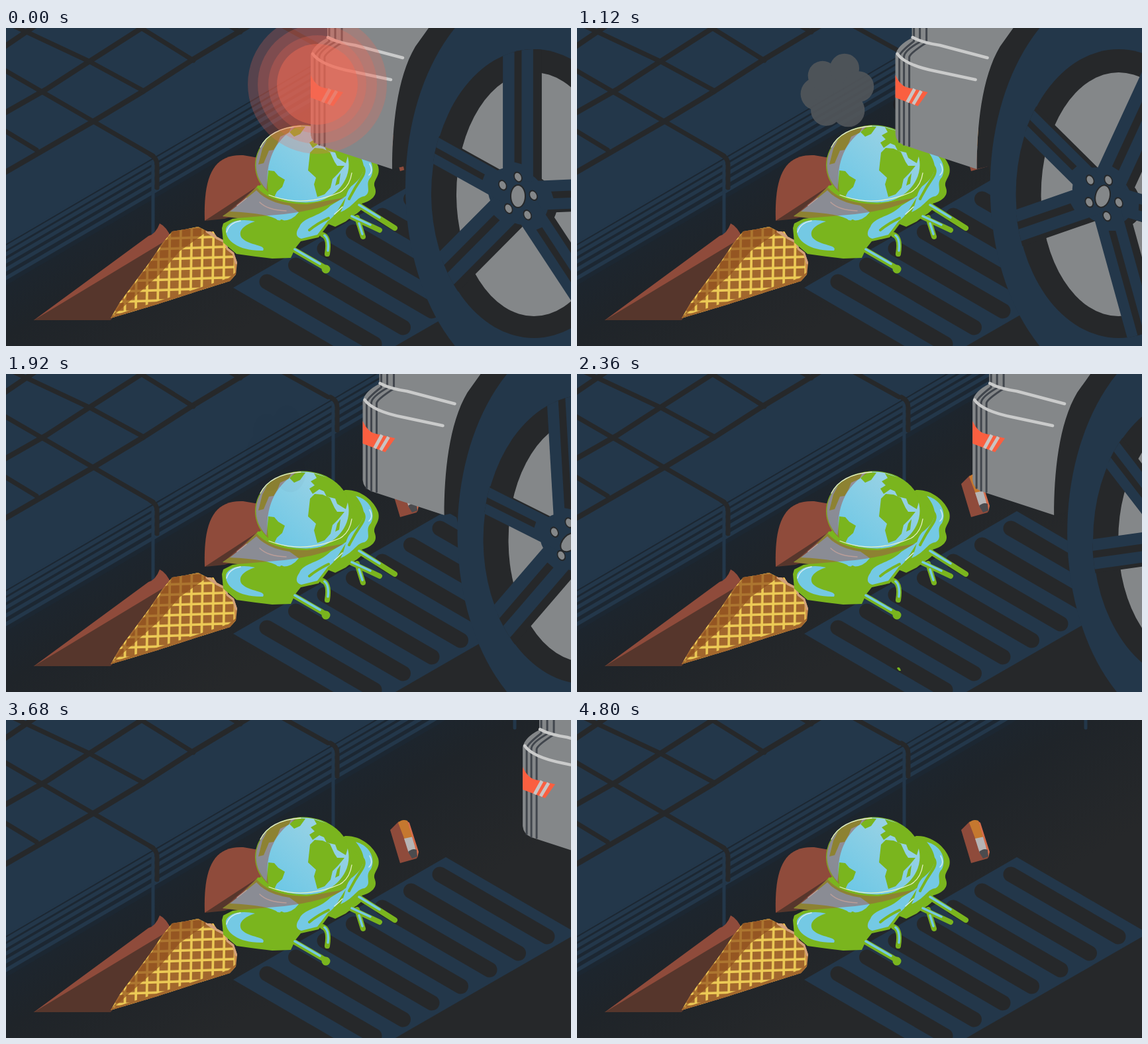
Recreate the animation shown at these times as an HTML page. Size 853 by 480 pixels, loop 5 s.

```html
<!DOCTYPE html>
<html lang="en">
<head>
<meta charset="utf-8">
<title>Melting world</title>
<style>
html, body { margin: 0; width: 100%; height: 100%; overflow: hidden; background: #26282a; }
svg { display: block; width: 100%; height: 100%; }
.navy { fill: #23374a; }
.dark { fill: #26282a; }
.grey { fill: #848789; }
.green { fill: #7ab51e; }
.blue { fill: #74c9e4; }
.red { fill: #8f4b3b; }
.brown { fill: #56362c; }
.line { fill: none; stroke-linecap: round; stroke-linejoin: round; }
</style>
</head>
<body>
<svg viewBox="0 0 853 480" preserveAspectRatio="none">
<defs>
  <linearGradient id="street" gradientUnits="userSpaceOnUse" x1="250" y1="180" x2="400" y2="430">
    <stop offset="0" stop-color="#1b2631"/><stop offset=".4" stop-color="#1f2429"/><stop offset="1" stop-color="#26282a"/>
  </linearGradient>
  <linearGradient id="sea" x1="0" x2="1" y1="1" y2="0">
    <stop offset="0" stop-color="#63c5e6"/><stop offset="1" stop-color="#a5d5e4"/>
  </linearGradient>
  <pattern id="waffle" width="16.5" height="15.5" patternUnits="userSpaceOnUse" patternTransform="translate(278 330) rotate(-2) skewX(-3)">
    <path d="M0 0H18V16H0Z" fill="#a2672d"/><path d="M0 2H18M2 0V16" stroke="#edcb56" stroke-width="3.6"/>
  </pattern>
  <clipPath id="rim"><ellipse cx="797" cy="250" rx="156" ry="218"/></clipPath>
  <clipPath id="ball"><ellipse cx="448" cy="207" rx="71" ry="60"/></clipPath>
  <clipPath id="cone"><path id="conePath" d="M158 438L172 414 192 387 218 352 236 325 251 307 270 304 290 300 304 307 313 307 318 315 332 322 335 332 344 339 349 354 347 372 338 382 290 397 225 418Z"/></clipPath>
  <g id="spokes"></g>
</defs>

<path fill="url(#street)" d="M0 0H853V480H0Z"/>
<path class="navy" d="M0 0H556L0 325Z"/>
<g id="pavement" class="line"></g>
<path class="navy" d="M343 392L664 207 862 322 541 507Z"/>
<g id="slots" class="line" stroke="#26282a" stroke-width="23"></g>

<!-- cone -->
<path class="red" d="M42 441L215 314Q226 311 232 295 243 300 250 318L158 440Z"/>
<path class="brown" d="M42 441L246 318 240 340 158 441Z"/>
<use href="#conePath" fill="#c98b4a"/>
<g clip-path="url(#cone)">
  <path fill="url(#waffle)" d="M150 290H340L347 390 150 450Z"/>
  <path fill="#8f4f1e" opacity=".68" d="M158 438L251 307 290 300 304 307 262 337 232 372 205 396Z"/>
  <path class="line" stroke="#a2672d" stroke-width="8" d="M160 439L290 397 338 381 349 372"/>
  <path class="line" stroke="#d2a07a" stroke-width="5" d="M304 307L318 316 332 323 335 333 344 340 348 354"/>
</g>

<!-- melting globe -->
<path class="red" d="M300 291C298 225 312 190 358 192L381 196 395 240Z"/>
<path class="brown" d="M300 291L378 240 384 270 330 288Z"/>
<path class="green" d="M327 284L350 268 378 240 512 175C535 174 556 191 562 209 566 225 552 230 557 241 562 255 548 262 537 265 543 275 527 280 513 292L497 300 487 296 472 316 445 322 437 332 430 347 402 348 377 345 348 341 328 324 326 302 328 295 342 288 350 287Z"/>
<g class="line" stroke="#7ab51e" stroke-width="8">
  <path d="M530 266L587 302M515 282L564 305M530 286L539 315M478 312Q489 316 485 341M432 333L482 362"/>
  <circle cx="483" cy="364" r="2.5"/>
</g>
<g class="line" stroke="#74c9e4" stroke-width="3.5">
  <path d="M533 267L564 286M522 284L550 297M533 295L538 311M481 313Q488 319 486 336M436 334L474 356"/>
</g>
<g class="blue">
  <path d="M332 303C336 291 356 287 376 292 360 297 349 306 356 317 368 329 394 327 388 336 352 337 330 321 332 303Z"/>
  <path d="M443 300C449 285 472 286 490 268L516 252C503 268 500 282 486 291L470 312 446 318C437 316 437 308 443 300Z"/>
  <path d="M528 184C551 190 558 211 551 225 540 236 554 247 541 254 529 255 526 269 505 278 514 261 511 251 521 239 538 226 550 211 528 184Z"/>
  <path d="M338 277L378 245Q394 263 428 268L442 278Q430 294 410 290 399 280 338 277Z"/>
</g>
<g class="line" stroke="#7ab51e" stroke-width="4"><path d="M527 200Q548 210 537 226T518 258M416 291Q438 303 453 284M458 305Q470 295 487 287"/></g>
<g class="line" stroke="#d7edee" stroke-width="1.5"><path d="M333 308Q337 294 354 291M383 263Q395 275 423 276M508 270L496 281M549 205Q555 216 548 222M349 268L363 257"/></g>
<ellipse class="green" cx="448" cy="207" rx="72" ry="60.5"/>
<g clip-path="url(#ball)">
  <ellipse fill="url(#sea)" cx="447.5" cy="206.5" rx="70" ry="59"/>
  <g class="green">
    <path d="M459 188L466 181 478 182 489 187 496 202 500 208 511 208 502 219 493 228 490 241 481 251 470 255 465 236 468 226 456 215Z"/>
    <path d="M463 181L458 173 466 168 460 162 469 157 465 150 491 158 506 172 517 190 513 204 500 196 497 188 484 185 480 177 473 174Z"/>
    <path d="M396 215L405 216 411 223 421 229 417 240 409 247 402 261 393 248Z"/>
    <path d="M387 182L396 165 417 153 431 149 427 158 414 164 410 174 404 184 397 185 389 204 381 206Z"/>
    <path d="M428 157L438 148 452 149 444 160 435 164Z"/>
    <path d="M500 226L505 219 503 235 497 238Z"/>
  </g>
  <path fill="#a05047" opacity=".5" d="M370 140H462C420 151 383 190 398 258L370 270Z"/>
</g>
<path class="line" stroke="#7ab51e" stroke-width="3" d="M381 239Q402 264 453 265 505 263 518 231"/>
<path class="line" stroke="#e5f1c9" stroke-width="1.3" d="M397 252Q448 272 504 248 519 239 522 219M384 180Q399 151 445 148"/>
<path fill="#a05047" opacity=".5" d="M327 285L378 240Q400 266 455 266L511 256Q480 274 420 281L350 287Z"/>
<path id="drop" class="green" d="M-3-2Q0-5 2-1L3 2Q0 3-3-2Z"/>

<!-- cigarette end -->
<path class="red" d="M580 166L593 153 622 202 620 209 595 216Z"/>
<path fill="#c5782f" d="M592 155Q598 149 606 152L615 178 602 181Z"/>
<path fill="#b6b4b5" d="M601 179L615 176 620 195 608 201Z"/>
<path fill="#d66c4b" d="M606 153L609 155 623 199 621 208 617 190Z"/>
<path fill="#4b4b4e" d="M607 199Q614 193 620 196L621 206 613 209Z"/>

<g id="smoke"></g>

<g id="car">
  <path class="dark" d="M583 213C583 150 590 75 618 28L638 0H1000V240H607L600 209Z"/>
  <path class="grey" d="M485 0V15Q463 26 460 41V160Q461 172 473 177L583 213C583 150 590 75 618 28L638 0Z"/>
  <path class="line" stroke="#41464d" stroke-width="3" d="M466 172V43Q466 37 488 20V0M473 176V43Q474 34 497 21V0M481 178V44Q482 38 507 22V0"/>
  <path fill="#fa5f40" d="M460 71Q468 88 479 90L509 97 494 118 460 105Z"/>
  <path stroke="#c9c5c4" stroke-width="5" d="M478 112L489 92M487 115L499 95"/>
  <path class="line" stroke="#cacbcb" stroke-width="4.5" d="M486 14Q500 22 527 26L599 45M463 39Q475 56 520 65L581 78"/>
  <ellipse class="navy" cx="800" cy="240" rx="197" ry="306"/>
  <ellipse class="dark" cx="797" cy="250" rx="155" ry="218"/>
  <ellipse class="grey" cx="797" cy="251" rx="117" ry="184"/>
  <g clip-path="url(#rim)">
    <use href="#spokes" x="13" y="4" fill="#26282a"/>
    <use href="#spokes" fill="#23374a"/>
    <g id="grooves" fill="#26282a"></g>
  </g>
  <g id="lugs" class="grey" stroke="#26282a" stroke-width="2"></g>
  <ellipse id="hub" class="grey" stroke="#26282a" stroke-width="2" rx="11" ry="17"/>
</g>
<g id="glow" fill="#f26a54"></g>
</svg>
<script>
const $ = id => document.getElementById(id);
const clamp = v => Math.max(0, Math.min(1, v));
const times = (n, f) => Array.from({ length: n }, (_, i) => f(i)).join('');
const stroke = (d, color, width) => `<path d="${d}" stroke="${color}" stroke-width="${width}"/>`;
const NAVY = '#23374a', DARK = '#26282a', SHADE = '#1c2732';

// Pavement: tile joints, stepped kerb edge, stone joints
$('pavement').innerHTML =
  stroke('M-5 30L45 -4M-5 130L60 93 125 51 208 -2M-5 220L130 142 208 95 283 47 368 -4', DARK, 8) +
  stroke('M-5 62L130 140 222 193M-5 153L46 184M12 -3L125 50 208 95M196 -5L283 49M338 -3L354 6M398 -14L492 38', DARK, 7) +
  stroke('M-10 361L640 -19', NAVY, 56) +
  times(6, i => {
    const y = 327 + i * 9 + i * i * .5;
    return stroke(`M-5 ${y + 3}L${y / .585 + 5} -3`, SHADE, 2 + i * .9);
  }) +
  [[222, 193, 311], [494, 37, 165]].map(([x, y, end]) =>
    stroke(`M${x} ${y + 10}V${end}`, NAVY, 5) +
    stroke(`M${x - 4} ${y - 2}Q${x + 6} ${y + 3} ${x + 6} ${y + 13}V${y + 48}`, DARK, 7)).join('') +
  stroke('M768 -5V12', NAVY, 5);

$('slots').innerHTML = times(7, i => `<path d="M${655 - 43.5 * i} ${233 + 25 * i}l162 94"/>`);

// Wheel: five double spokes in a skewed plane
const spin = f => times(5, i => `<g transform="rotate(${i * 72})">${f}</g>`);
$('spokes').innerHTML = '<circle r="42"/>' + spin('<path d="M-21 0V-300H21V0Z"/>');
$('grooves').innerHTML = spin('<path d="M-5 -50V-300H5V-50Z"/>');
$('lugs').innerHTML = spin('<circle cy="-29" r="7"/>');

const rings = [105, 90, 74, 61];
$('glow').innerHTML = rings.map(r => `<circle cy="85" r="${r}"/>`).join('');

// Exhaust puffs: birth time, x, y, width, colour
const puffs = [
  [600, 445, 94, 1, '#53575b'], [1000, 506, 113, .78, '#1d1d20'],
  [2550, 640, 95, 1.05, '#3c3d40'], [2720, 703, 94, .78, '#1f1d1e'],
  [3720, 840, 92, 1, '#232425']
];
const lobes = [[0, 0, .7], [-.55, .1, .45], [-.4, -.4, .4], [.2, -.6, .4], [.58, -.1, .42], [.3, .55, .45], [-.3, .55, .42]];
$('smoke').innerHTML = puffs.map(p => `<g fill="${p[4]}">${
  lobes.map(([x, y, r]) => `<circle cx="${x}" cy="${y}" r="${r}"/>`).join('')}</g>`).join('');

// Car position over time, smooth through its key poses
const keys = [[0, 0], [720, 8], [1520, 42], [2360, 137], [3000, 266], [3680, 320], [4480, 425], [5000, 520]];
const pace = i => (keys[i + 1][1] - keys[i][1]) / (keys[i + 1][0] - keys[i][0]);
const slope = i => i === 0 ? 0 : i === keys.length - 1 ? pace(i - 1)
  : 2 * pace(i - 1) * pace(i) / (pace(i - 1) + pace(i));
function travel(t) {
  let i = 0;
  while (i < keys.length - 2 && t >= keys[i + 1][0]) i++;
  const [t0, a] = keys[i], [t1, b] = keys[i + 1], h = t1 - t0, u = (t - t0) / h;
  return a + (b - a) * u * u * (3 - 2 * u)
    + h * u * (1 - u) * (slope(i) * (1 - u) - slope(i + 1) * u);
}

function draw(t) {
  const d = travel(t), turn = 1.05 * d - .0022 * d * d;
  $('car').setAttribute('transform', `translate(${d})`);
  for (const [id, width] of [['spokes', 1.09], ['grooves', 1.09], ['lugs', .84]])
    $(id).setAttribute('transform', `translate(773 254) matrix(${width} .28 0 1 0 0) rotate(${turn})`);
  $('hub').setAttribute('transform', `translate(773 254) rotate(${turn * .65})`);

  [...$('glow').children].forEach((ring, i) => {
    const inner = i === rings.length - 1;
    ring.setAttribute('cx', 470 + 17 * t / 720);
    ring.setAttribute('opacity', inner ? .45 * clamp((1080 - t) / 340) : .25 * clamp((640 - t) / 480));
  });

  puffs.forEach(([born, x, y, width], i) => {
    const age = (t - born) / 1000, puff = $('smoke').children[i];
    const size = age > 0 ? 70 * (1 - Math.exp(-3 * age)) : 0;
    puff.setAttribute('transform', `translate(${x - 100 * age} ${y}) scale(${size * width} ${size})`);
    puff.setAttribute('opacity', .88 * clamp((.93 - age) / .4));
  });

  const fall = t < 2230 || t > 4000 ? -1 : (t - 2230) % 780;
  const y = 367 + .0046 * fall * fall;
  $('drop').setAttribute('transform', `translate(486 ${fall < 0 || y > 490 ? -20 : y})`);
}

function frame() {
  draw(performance.now() % 5000);
  requestAnimationFrame(frame);
}
frame();
</script>
</body>
</html>
```
